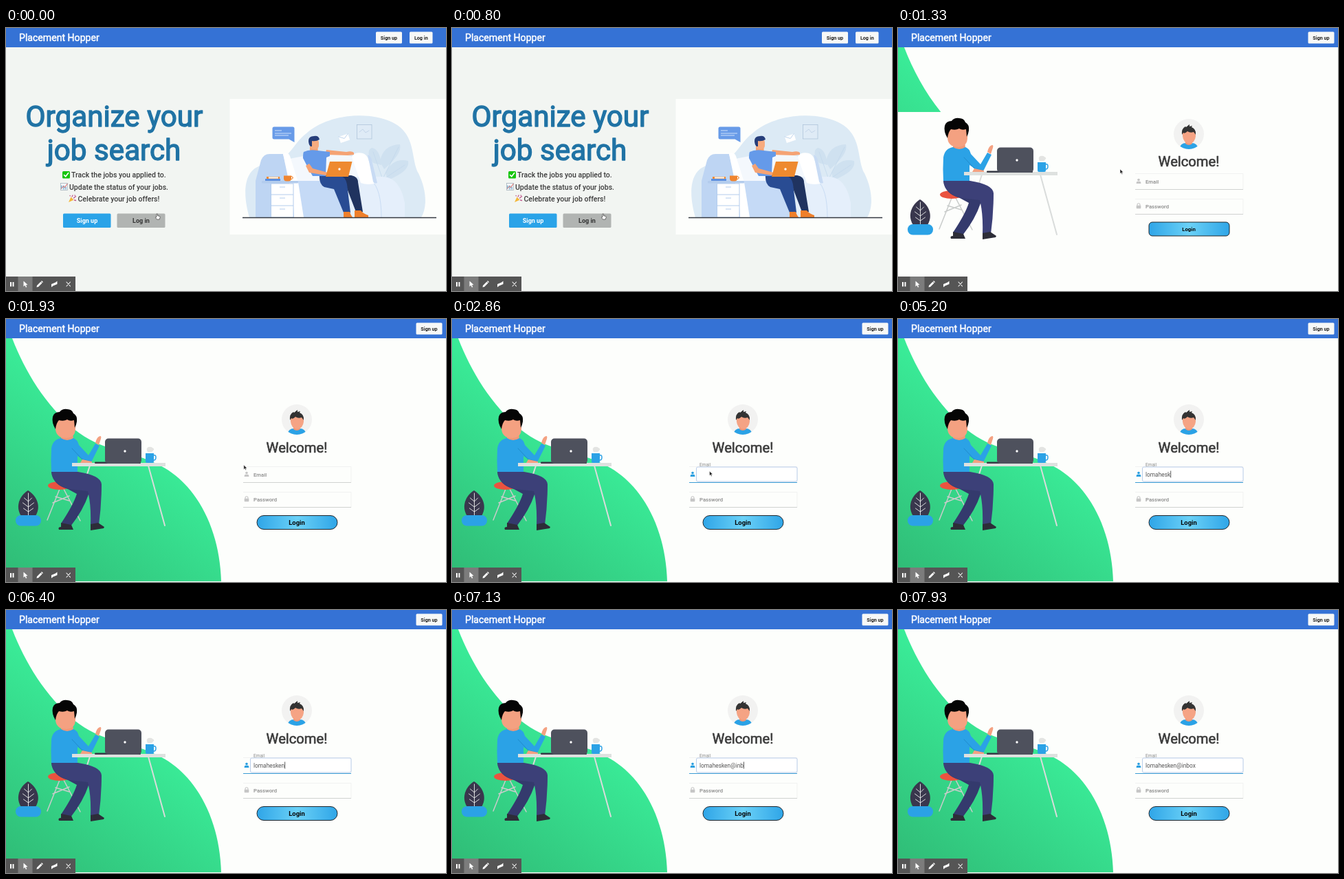
Write an HTML page that moves like this. It is 640 px wide and 382 px high and loops after 8 s.

```html
<!DOCTYPE html>
<html lang="en">
<head>
<meta charset="utf-8">
<title>Job search sign-in</title>
<style>
  html, body { margin: 0; height: 100%; overflow: hidden; background: #fdfefc; }
  svg { display: block; width: 100vw; height: 100vh; }
  text { font-family: Roboto, sans-serif; }
  .bold { font-weight: 700; }
  .heavy { stroke-width: 0.033em; stroke-linejoin: round; }
  .mid { text-anchor: middle; }
  .line { fill: none; stroke-linecap: round; stroke-linejoin: round; }
</style>
</head>
<body>
<svg viewBox="0 0 640 382">
  <defs>
    <linearGradient id="green" x1="0.65" y1="0" x2="0" y2="1">
      <stop offset="0.3" stop-color="#3aec98"/><stop offset="1" stop-color="#2fba75"/>
    </linearGradient>
    <linearGradient id="shine">
      <stop stop-color="#2fa5e7"/><stop offset="0.5" stop-color="#6ad1f7"/><stop offset="1" stop-color="#2fa5e7"/>
    </linearGradient>
    <clipPath id="waveClip"><rect id="waveWindow" y="28" width="320" height="94"/></clipPath>
    <clipPath id="avatarClip"><circle cx="423" cy="146" r="22"/></clipPath>
    <g id="person"><circle cx="350" cy="223.500" r="1.800"/><path d="M346.700 229v-1.300q0-2 2-2h2.600q2 0 2 2v1.300z"/></g>
    <g id="lock"><rect x="346.700" y="260.800" width="6.600" height="4.400" rx="0.800"/><path d="M348 261v-1.300a2 2 0 0 1 4 0V261" fill="none" stroke="#c6c6c6" stroke-width="1.100"/></g>
  </defs>

  <rect width="640" height="382" fill="#fdfefc"/>

  <g id="home">
    <rect width="640" height="382" fill="#f2f5f2"/>
    <g class="mid" font-size="42.200" fill="#2073a5" stroke="#2073a5">
      <text class="heavy" x="157.500" y="143">Organize your</text>
      <text class="heavy" x="157" y="191.500">job search</text>
    </g>
    <g font-size="10.500" fill="#3c3c3c" font-weight="500">
      <text x="95" y="217">Track the jobs you applied to.</text>
      <text x="92" y="234.500">Update the status of your jobs.</text>
      <text x="104.500" y="252">Celebrate your job offers!</text>
    </g>
    <rect x="82" y="208" width="11" height="10.500" rx="1.500" fill="#16c60c"/>
    <path class="line" d="M84.500 213.500l2.200 2.300 4-5.300" stroke="#fff" stroke-width="1.600"/>
    <rect x="79.500" y="225.500" width="10" height="10" fill="#f5f7f8" stroke="#a6b4bd" stroke-width="0.800"/>
    <path class="line" d="M81 233v-4M84 234v-5M87 234v-3" stroke="#5a9bc5" stroke-width="1.200"/>
    <path class="line" d="M80.500 233l3-3 2 1.500 3.500-5" stroke="#d9534f"/>
    <path d="M91 253l3.500-7.500 4 4.300z" fill="#f4b83a"/>
    <path class="line" d="M96 245l1-2M98.500 247l3-2.500M99.500 250l2 .5M93 243.500l.4.400M100 243l.3.300" stroke="#c0588c" stroke-width="1.300"/>
    <rect x="83" y="269.500" width="69.500" height="20.500" rx="1.500" fill="#2aa3e8"/>
    <rect id="loginLink" x="161.500" y="269.500" width="70" height="20.500" rx="1.500"/>
    <g class="mid bold" font-size="9">
      <text x="118" y="283" fill="#fff">Sign up</text><text x="196.500" y="283" fill="#333">Log in</text>
    </g>

    <rect x="325.500" y="103" width="314.500" height="197" fill="#fdfefc"/>
    <path d="M354 275C345 245 343 205 374 199C415 194 414 170 437 153C467 126 525 120 560 136C598 153 588 190 600 211C613 238 612 262 604 275z" fill="#dceaf5"/>
    <g fill="#cfe1f0">
      <path d="M534 196q-12-17-2-22 12 2 14 25zM544 194q4-24 29-25 4 13-23 36zM552 210q11-22 33-17 3 15-30 28z"/>
      <path class="line" d="M534 180l14 40M571 173l-22 44M580 199l-30 20" stroke="#c3d8ec" stroke-width="0.800"/>
    </g>
    <rect x="510.500" y="140.500" width="21.500" height="20.500" fill="#dfebf6" stroke="#a9bfd8" stroke-width="0.700"/>
    <path class="line" d="M514 151l5-4 4 5 5-3" stroke="#b8cce2" stroke-width="0.700"/>
    <g transform="rotate(-18 492 160)"><rect x="485" y="155.500" width="14" height="9.500" fill="#fff"/><path class="line" d="M485 155.500l7 5 7-5" stroke="#b7cfea" stroke-width="0.800"/></g>
    <path d="M390 143.500h27q2.500 0 2.500 2.500v20l-8-4.500h-21.500q-2.500 0-2.500-2.500V146q0-2.500 2.500-2.500z" fill="#689be8"/>
    <path d="M391 149h10M391 153h24M391 156h20" stroke="#dceafb" stroke-width="0.900"/>

    <path d="M363 275V222L371 192Q375 182 385 183H403L425 275z" fill="#bed5f3"/>
    <path d="M412 190l13 36h91V190q-30-10-62-8z" fill="#f4f8fd"/>
    <path d="M418 222h60q12 2 13 14l2 39h-67q-1-30-8-53z" fill="#c5daf6"/>
    <path d="M403 183q7-4 10 3l12 38 8 51H419q-1-28-8-54z" fill="#fff"/>
    <path d="M500 216h48q25 1 32 38v21h-78z" fill="#e5effb"/>
    <path class="line" d="M532 222q14 12 14 53" stroke="#c9dcf4"/>
    <path d="M503 187q5-8 16-5 6 2 8 9l12 34q-12 4-23 0z" fill="#fff"/>
    <path d="M526 184q5 2 6 8l8 33q-5 2-6-2z" fill="#c8dbf4"/>
    <rect x="385.500" y="226" width="32.500" height="49" fill="#fff" stroke="#b3cced"/>
    <path d="M386 242h32M386 258h32M398 231h8M398 247h8M398 263h8" stroke="#b3cced"/>
    <rect x="372" y="222" width="53" height="3.500" rx="1" fill="#b3cced"/>
    <path d="M377 219h22v3h-22z" fill="#5b8fe0"/><path d="M379 216h19v3h-19z" fill="#ef8b34"/><path d="M382 216.500h14v2h-14z" fill="#fff"/>
    <path d="M404 214.500h11v4q0 4-4 4h-3q-4 0-4-4z" fill="#ef8530"/><circle cx="415" cy="217.500" r="2.200" class="line" stroke="#ef8530"/>

    <path d="M472 215l30-1q10 2 10 10l7 43h-10l-13-34-24-4z" fill="#20335f"/>
    <path d="M456 213h26q12 2 14 14l5 41h-10l-14-34-14-3q-8-4-7-18z" fill="#294c93"/>
    <path d="M491 267h9q1 4 4 8h-13zM507 265h9q4 5 11 7v3h-20z" fill="#ef7f2b"/>
    <path d="M466 177l29 3q8-2 11 1v3l-9 1-33-1z" fill="#f5a374"/>
    <path d="M442 168h11l1 14h-12z" fill="#f5a374"/>
    <path d="M433 180q8-4 20-2l18 2v6l-5 2-1 27h-19q-8-14-14-26 0-7 1-9z" fill="#659ae9"/>
    <path d="M436 200l5 10 25 4 2-4-22-6-5-7z" fill="#f5a374"/>
    <rect x="442" y="161" width="13" height="15" rx="5" fill="#f7ab7f"/>
    <path d="M440 164q0-7 8-7 7-1 8 5-5 3-11 2v8h-2q-3-3-3-8z" fill="#263e7a"/>
    <path d="M471 194h32q1 0 0 2l-5 20h-33z" fill="#ee8a2f"/><circle cx="485" cy="205" r="1.700" fill="#fff"/>
    <path d="M344 275.500h282" stroke="#343841" stroke-width="1.400"/>
  </g>

  <g id="signIn">
    <path clip-path="url(#waveClip)" d="M0 28H9C28 77 57 124 99 160C139 192 175 190 214 208C275 233 311 303 313 381H0z" fill="url(#green)"/>

    <path d="M32 249C18 258 14 274 22 286H43C51 273 46 258 32 249z" fill="#39374d"/>
    <path class="line" d="M32.500 253v32M32.500 265l-6-5M32.500 265l5-5M32.500 273l-8-6M32.500 273l8-6M32.500 280l-7-5M32.500 280l7-5" stroke="#eef0ee" stroke-width="0.900"/>
    <rect x="14" y="285" width="37" height="15.500" rx="7.500" fill="#2ba2e6"/>

    <path class="line" d="M78 247L60 292M84 247l24 46M72 258l20 6M92 257l-24 10" stroke="#c9cccb" stroke-width="1.500"/>
    <ellipse cx="78" cy="242" rx="17" ry="6" fill="#ea5340"/>
    <path class="line" d="M122 213l-17 52M207 213l24 87" stroke="#d9dcdb" stroke-width="2"/>
    <path d="M66 222Q68 241 90 247L103 254Q98 270 80 297L94 301Q113 277 121 252Q123 236 100 222z" fill="#343a6d"/>
    <path d="M66 222H105Q138 227 139 240Q139 270 135 299L123 298Q124 270 119 250L92 247Q68 241 66 222z" fill="#3c4078"/>
    <path d="M80 296l15 3 3 7H77q-2-4 3-4zM123 298l11-2 9 6-1 2-19 3z" fill="#2d2d38"/>
    <path d="M80 163h17l1 12q-9 8-18 1z" fill="#ef9877"/>
    <path d="M66 222q-1-18 0-34 2-13 14-15 9 6 18 0 6 2 8 10l14 15 10-17 6 3-11 22q-4 5-9 1l-12-8v23z" fill="#2ba2e6"/>
    <path class="line" d="M96 188l15 16 13 3" stroke="#218bcc" stroke-width="1"/>
    <path d="M130 180q2-9 7-10 2 0 1 4l-3 9zM111 204l14 3v2h-17z" fill="#f4a181"/>
    <path d="M72 145q0-8 14-8t15 9v13q0 13-13 14-16 0-16-15z" fill="#f4a181"/>
    <path d="M72 160q-6-10-4-18 2-7 10-7 4-5 11-4 7 0 9 6 6 3 5 12-1 6-3 9l-1-11q-6 2-10-1-5 3-12 1-4 4-5 13z" fill="#050505"/>
    <rect x="96" y="209" width="136" height="5" fill="#dee1df"/>
    <rect x="129" y="207.500" width="67" height="2.500" rx="1" fill="#383b47"/>
    <rect x="144" y="173.500" width="53" height="36.500" rx="5" fill="#4e515d"/><circle cx="173" cy="192" r="1.700" fill="#fff"/>
    <path d="M203 195h12v12q0 2-2 2h-8q-2 0-2-2z" fill="#2ba2e6"/><path class="line" d="M215 198q3-1 3 3t-3 4" stroke="#2ba2e6" stroke-width="1.500"/>
    <path d="M206 193q-3-5 1-7 4-1 6 1 4 2 1 4-1 3-8 2z" fill="#e3e4e2"/>

    <g id="avatar">
      <circle cx="423" cy="146" r="22" fill="#f2f2f1"/>
      <g clip-path="url(#avatarClip)">
        <path d="M409 169q1-10 10-10h8q9 0 10 10z" fill="#2ba2e6"/>
        <path d="M418 154h10v6q-5 4-10 0z" fill="#ee9778"/>
        <path d="M414 142h19v7q-1 10-9.500 11-8.500-1-9.500-11z" fill="#f5a384"/>
        <path d="M413 147q-1-9 5-12l1 1 5-4v3l4-1-1 2q7 3 6 11l-3-4q-5 2-9-1-4 4-6 2z" fill="#333"/>
      </g>
    </g>
    <text id="welcome" class="mid heavy" x="423" y="194" font-size="20.200" fill="#3d3d3d" stroke="#3d3d3d">Welcome!</text>
    <g id="emailRow">
      <path d="M345 214.500h157v23" fill="none" stroke="#f1f2f1"/>
      <path d="M345 237.500h157" stroke="#d0d2d1"/>
      <path id="underline" stroke="#3a9bd4" stroke-width="1.200"/>
      <rect id="inputBox" x="355.500" y="215" width="146.500" height="21" rx="2" fill="#fff" stroke="#b9cdea"/>
      <use id="emailIcon" href="#person"/>
      <text id="emailLabel" x="360" fill="#8a8a8a">Email</text>
      <text id="typed" x="360" y="228.500" font-size="8.350" fill="#555"></text>
      <path id="caret" stroke="#333" stroke-width="0.800"/>
    </g>
    <g id="passwordRow">
      <path d="M345 251.500h157v22" fill="none" stroke="#f1f2f1"/>
      <path d="M345 273.500h157" stroke="#d0d2d1"/>
      <use href="#lock" fill="#c6c6c6"/>
      <text x="360" y="264.500" font-size="7.700" fill="#8a8a8a" font-weight="500">Password</text>
    </g>
    <g id="loginRow">
      <rect id="loginButton" x="365" y="285.500" width="117" height="20" fill="url(#shine)" stroke="#20262b"/>
      <text id="loginText" class="mid bold" x="423" fill="#050505">Login</text>
    </g>
  </g>

  <rect width="640" height="28" fill="#3572d5"/>
  <text class="heavy" x="19" y="19" font-size="14.100" fill="#fff" stroke="#fff">Placement Hopper</text>
  <g class="mid bold" font-size="7.200" fill="#222">
    <g id="signUpLink"><rect x="596.500" y="5.500" width="38" height="17" rx="1.500" fill="#f7f8f7"/><text x="615.500" y="16.700">Sign up</text></g>
    <g id="logInLink"><rect x="587" y="5.500" width="33.500" height="17" rx="1.500" fill="#f7f8f7"/><text x="603.800" y="16.700">Log in</text></g>
  </g>

  <path d="M0 361h101v21H0z" fill="#555"/><path d="M17.500 361h21v21h-21z" fill="#7c7c7c"/>
  <g fill="#fff">
    <path d="M6 369h2v6.500H6zM9.500 369h2v6.500h-2zM25.500 367.500v8l2-1.700 1.400 3 1.400-.6-1.400-2.900 2.600-.2z"/>
    <path d="M45 374l5.500-5.500 2 2L47 376l-2.500.5zM51 368l1-1 2 2-1 1zM66 372l6-2.500 2.500-2v4.500l-6 2.500-2.500 2z"/>
    <path class="line" d="M88 369l5.500 6M93.500 369l-5.500 6" stroke="#fff" stroke-width="1.100"/>
  </g>

  <g id="pointer" fill="#222" stroke="#fff" stroke-width="0.500">
    <path id="arrow" d="M0-1v6.500l1.600-1.300 1 2.200 1.100-.5-1-2.100 2-.2z"/>
    <path id="hand" fill="#fff" stroke="#222" stroke-width="0.600" d="M-.8-4q1-.8 1.400.3v2.400l3 .7q.9.500.4 2l-.8 2.600h-3.800l-2-2.800q.1-1.200 1.400-.3z"/>
  </g>
</svg>
<script>
const LOOP = 8000, PAGE_AT = 1150, WAVE_AT = 1450, FOCUS_AT = 2300;
const EMAIL = "lomahesken@inbox";
const KEY_TIMES = [3600, 3730, 3860, 4000, 4260, 4700, 4900, 5130,
                   5600, 5930, 6500, 6730, 6930, 7130, 7260, 7400];
const POINTER_PATH = [[900, 220, 274], [1330, 323, 206], [1700, 323, 206], [2200, 374.5, 222]];

const el = id => document.getElementById(id);
const set = (id, attrs) => { for (const k in attrs) el(id).setAttribute(k, attrs[k]); };
const show = (id, on) => set(id, { display: on ? "inline" : "none" });
const shift = (id, x, y) => set(id, { transform: `translate(${x} ${y})` });
const mix = (a, b, p) => a + (b - a) * p;
const ease = (t, from, to) => {
  const p = Math.min(1, Math.max(0, (t - from) / (to - from)));
  return p * p * (3 - 2 * p);
};

function pointerAt(t) {
  let [, x, y] = POINTER_PATH[0];
  for (let i = 1; i < POINTER_PATH.length; i++) {
    const [start] = POINTER_PATH[i - 1], [end, nx, ny] = POINTER_PATH[i];
    const p = ease(t, start, end);
    x = mix(x, nx, p);
    y = mix(y, ny, p);
  }
  return [x, y];
}

function drawPointer(t, onHome) {
  const [x, y] = pointerAt(t);
  const hovering = onHome && x < 231.5 && y > 269.5;
  shift("pointer", x, y);
  show("pointer", t < KEY_TIMES[0]);
  show("arrow", !hovering);
  show("hand", hovering);
  set("loginLink", { fill: hovering ? "#b1b4b2" : "#dfe2e0" });
}

function drawForm(t) {
  const settle = ease(t, 1330, 1700), away = 1 - settle;
  shift("avatar", 0, 8 * away);
  shift("welcome", 0, 7 * away);
  shift("emailRow", 0, -3 * away);
  shift("passwordRow", 0, -3 * away);
  shift("loginRow", 0, -3.5 * away);
  set("loginButton", { rx: mix(5, 10, settle) });
  set("loginText", { "font-size": mix(7.8, 9.4, settle), y: mix(298.3, 298.8, settle) });
  set("waveWindow", { height: t < WAVE_AT ? 94 : 354 });

  const focused = t >= FOCUS_AT, lift = ease(t, FOCUS_AT, FOCUS_AT + 300);
  show("inputBox", focused);
  set("emailIcon", { fill: focused ? "#2b9fe0" : "#c6c6c6" });
  set("underline", { d: `M345 237.500h${157 * lift}` });
  set("emailLabel", {
    y: mix(228.5, 213.5, lift), "font-size": mix(7.7, 6.5, lift), "font-weight": focused ? 400 : 500
  });
}

function drawTyping(t) {
  const pressed = KEY_TIMES.filter(k => k <= t);
  el("typed").textContent = EMAIL.slice(0, pressed.length);
  const lastInput = pressed.length ? pressed[pressed.length - 1] : FOCUS_AT;
  show("caret", t >= FOCUS_AT && (t - lastInput) % 1000 < 500);
  const x = 360.5 + (pressed.length ? el("typed").getComputedTextLength() : 0);
  set("caret", { d: `M${x} 220.500v10` });
}

function draw(t) {
  const onHome = t < PAGE_AT;
  show("home", onHome);
  show("signIn", !onHome);
  show("logInLink", onHome);
  shift("signUpLink", onHome ? -58.5 : 0, 0);
  drawPointer(t, onHome);
  if (!onHome) {
    drawForm(t);
    drawTyping(t);
  }
}

const start = performance.now();
function tick() {
  draw((performance.now() - start) % LOOP);
  requestAnimationFrame(tick);
}
tick();
</script>
</body>
</html>
```
